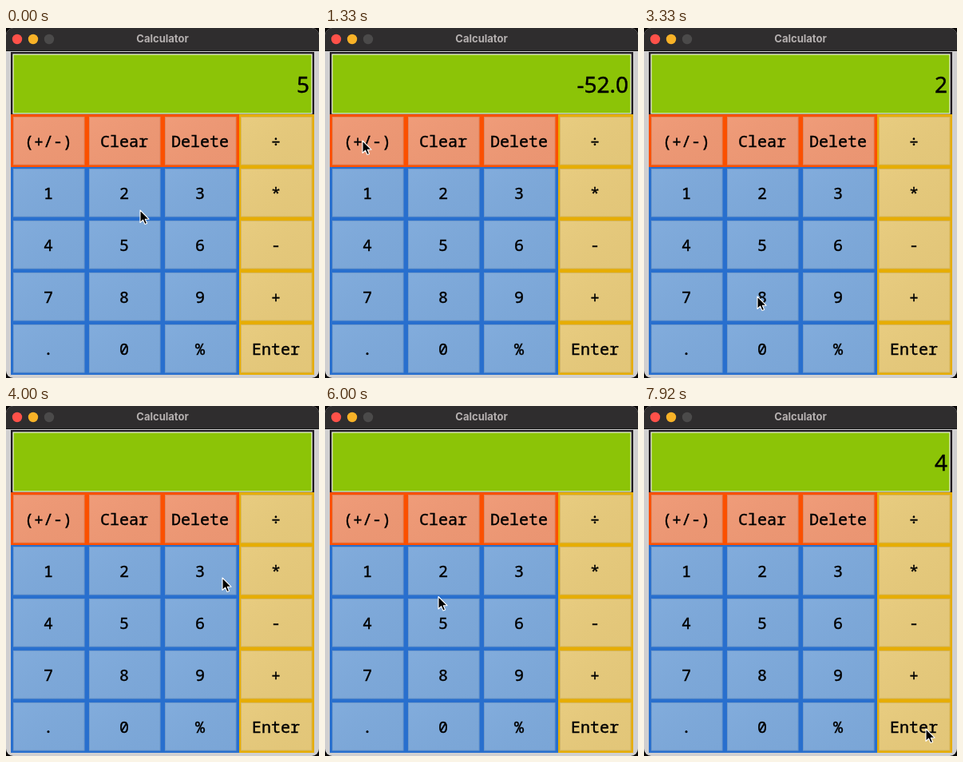
An HTML page that plays this animation: 392x438 px, repeating every 8 s.

```html
<!DOCTYPE html>
<html lang="en">
<head>
<meta charset="utf-8">
<title>Calculator</title>
<style>
  html, body { margin: 0; width: 100%; height: 100%; overflow: hidden; background: #080606; }
  svg { display: block; width: 392px; height: 438px; }
  .title { font: 700 13px Inter, sans-serif; fill: #b5b0b0; text-anchor: middle; }
  .label { font: 20px "Noto Sans Mono", monospace; stroke: #000; stroke-width: .4; text-anchor: middle; }
  .value { font: 28px "Noto Sans", sans-serif; stroke: #000; stroke-width: .4; text-anchor: end; }
</style>
</head>
<body>
<svg viewBox="0 0 392 438">
  <defs>
    <linearGradient id="shade" x1="0" y1="0" x2="1" y2="1">
      <stop offset="0" stop-color="#fff" stop-opacity=".04"/>
      <stop offset="1" stop-color="#000" stop-opacity=".02"/>
    </linearGradient>
    <clipPath id="window"><rect width="392" height="438" rx="9"/></clipPath>
  </defs>
  <g clip-path="url(#window)">
    <rect width="392" height="438" fill="#d0cfd0"/>
    <rect width="392" height="28" fill="#2f2d2e"/>
    <rect y="28" width="392" height="1" fill="#111"/>
    <circle cx="14" cy="14" r="6.2" fill="#ff5149"/>
    <circle cx="34" cy="14" r="6.2" fill="#f8b227"/>
    <circle cx="54" cy="14" r="6.2" fill="#4b4a4a"/>
    <text class="title" x="196" y="18">Calculator</text>
    <rect x="6" y="30" width="380" height="78" fill="#211c22"/>
    <rect x="9" y="33" width="374" height="74" fill="#8cc407" stroke="#f4f8e4" stroke-width="1.2"/>
    <text class="value" id="value" x="380" y="81"></text>
    <rect x="6" y="108" width="286" height="66" fill="#fb5000"/>
    <rect x="6" y="174" width="286" height="260" fill="#286fce"/>
    <rect x="292" y="108" width="94" height="326" fill="#e6ad04"/>
    <g id="keys"></g>
  </g>
  <path id="cursor" d="M0 0V15.5L3.6 12.1L6 17.6L8.6 16.5L6.3 11.2H11Z" stroke="#fff" stroke-width="1.1" stroke-linejoin="round"/>
</svg>
<script>
const STEP = 1000 / 12, LOOP = 96, TRAVEL = 7;
const rows = ["(+/-) Clear Delete ÷", "1 2 3 *", "4 5 6 -", "7 8 9 +", ". 0 % Enter"]
  .map(row => row.split(" "));
const operators = {
  "÷": (a, b) => a / b, "*": (a, b) => a * b, "-": (a, b) => a - b, "+": (a, b) => a + b
};

// The step of each visit, and the key pressed or the point passed
const visits = [
  [0, [168, 228]], [3, "2"], [12, "(+/-)"], [28, "Clear"],
  [34, "2"], [41, "8"], [46, "*"], [48, [271, 215]], [51, "3"], [57, "Enter"],
  [66, "Clear"], [76, "8"], [81, [323, 243]], [85, "÷"], [91, "4"], [95, [353, 404]]
].map(([step, goal]) => typeof goal === "string"
  ? { step, key: goal, point: aim(goal) }
  : { step, point: goal });

const keys = document.getElementById("keys");
const value = document.getElementById("value");
const cursor = document.getElementById("cursor");

function keyCenter(row, col) {
  return [53 + 95 * col, 141 + 65 * row];
}

function aim(key) {
  const row = rows.findIndex(labels => labels.includes(key));
  const [x, y] = keyCenter(row, rows[row].indexOf(key));
  return [x - 6, y];
}

function add(tag, attrs, text = "") {
  const node = document.createElementNS("http://www.w3.org/2000/svg", tag);
  for (const name in attrs) node.setAttribute(name, attrs[name]);
  node.textContent = text;
  keys.append(node);
}

function faceColors(row, col) {
  if (col === 3) return ["#e7ca7b", "#d6b65f"];
  return row === 0 ? ["#ef9874", "#e08762"] : ["#7da9db", "#6e99cb"];
}

rows.forEach((labels, row) => labels.forEach((label, col) => {
  const [x, y] = keyCenter(row, col);
  const [fill, stroke] = faceColors(row, col);
  const box = { x: x - 43.5, y: y - 29.5, width: 88.5, height: 59.5 };
  add("rect", { ...box, fill, stroke });
  add("rect", { ...box, fill: "url(#shade)" });
  add("text", { class: "label", x, y: y + 8 }, label);
}));

function press(state, key) {
  const { text, stored, operator } = state;
  if (key === "Clear") return { text: "" };
  if (key === "(+/-)") return { ...state, text: (-text).toFixed(1) };
  if (key === "Enter") return { text: operators[operator](stored, +text).toFixed(1) };
  if (key in operators) return { text: "", stored: +text, operator: key };
  return { ...state, text: text + key };
}

function displayAt(step) {
  return visits
    .filter(visit => visit.key && visit.step <= step)
    .reduce((state, visit) => press(state, visit.key), { text: "5" }).text;
}

function pointerAt(step) {
  const next = visits.findIndex(visit => visit.step > step);
  if (next < 0) return visits.at(-1).point;
  const from = visits[next - 1], to = visits[next];
  const leave = Math.max(from.step + (from.key ? 1 : 0), to.step - TRAVEL);
  const arrive = to.step - (to.key ? 1 : 0);
  const u = Math.min(1, Math.max(0, (step - leave) / (arrive - leave)));
  const ease = u * u * (3 - 2 * u);
  return from.point.map((p, i) => p + (to.point[i] - p) * ease);
}

const start = performance.now();
function tick() {
  const step = Math.floor((performance.now() - start + 5) / STEP) % LOOP;
  cursor.setAttribute("transform", `translate(${pointerAt(step)})`);
  value.textContent = displayAt(step);
  requestAnimationFrame(tick);
}
tick();
</script>
</body>
</html>
```
